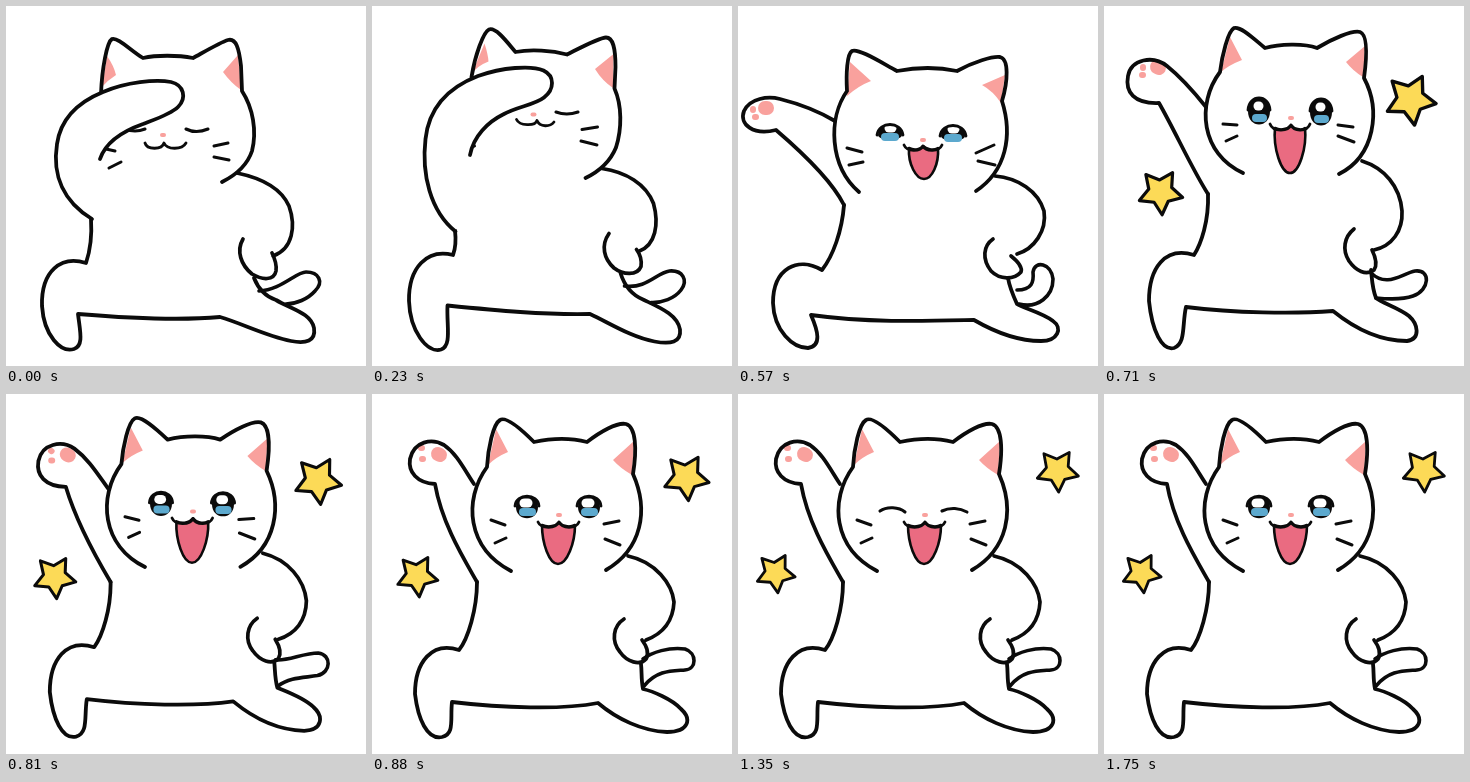
An HTML page for the animation above (1.85 s loop, 360 px wide and 360 px high).

```html
<!DOCTYPE html>
<html lang="en">
<head>
<meta charset="utf-8">
<title>Cat</title>
<style>
html, body { margin: 0; width: 100%; height: 100%; overflow: hidden; background: #fff; }
svg { display: block; width: 100%; height: 100%; }
</style>
</head>
<body>
<svg id="stage" viewBox="0 0 360 360" fill="none" stroke-linecap="round" stroke-linejoin="round"></svg>
<script>
const LOOP = 1850;
const INK = '#0b0b0b', PINK = '#f9a19d', YELLOW = '#fcda57';

// Poses that share keys share path structure, so they can be blended.
const hide = {
  ears: 'M101 50Q108 60 110 69Q102 74 96 81ZM232 49L217 66Q225 77 235 84Z',
  head: 'M95 88C96 62 101 36 106 33C112 31 124 44 137 52C150 49 172 49 187 52C198 46 215 36 222 34C230 32 233 42 235 60L236 85C247 102 251 125 246 145C241 160 228 170 216 176',
  nose: 'M156 129L158 129',
  lips: 'M139 137C141 144 156 144 158 137C161 144 176 144 180 137',
  lids: 'M119 123Q129 127 139 123M180 123Q190 128 202 123',
  whiskers: 'M100 143L109 145M103 162L115 156M208 140L222 137M208 151L223 154',
  arm: 'M86 213C58 196 46 170 51 138C55 110 75 95 97 86C120 76 150 73 165 76C178 79 181 92 172 101C165 108 150 113 137 118C120 124 100 135 94 153',
  legs: 'M85 213C86 228 85 242 80 257C55 249 35 265 36 300C38 330 55 347 68 343C78 340 74 325 72 308C120 312 170 315 214 311C235 317 260 330 285 335C300 338 310 335 308 322C305 307 285 303 270 294C258 290 252 282 248 272',
  side: 'M231 167C255 172 275 182 283 200C290 220 287 243 267 250M237 233C230 245 235 259 246 268C256 274 268 275 270 265C271 258 268 251 266 247',
  tail: 'M253 285C275 284 290 266 300 266C313 266 318 276 309 285C302 293 290 298 280 298'
};
const peek = {
  ears: 'M124 25Q124 36 123 42Q110 45 104 54ZM251 47L229 60Q235 72 247 80Z',
  head: 'M104 54C110 36 122 16 128 14C136 11 146 28 150 40C168 37 188 40 203 45C218 38 240 27 246 29C252 31 254 42 252 62L249 80C253 97 249 120 242 138C235 152 224 162 211 168',
  nose: 'M165 88L167 88',
  lips: 'M150 90C154 96 170 97 172 92C175 99 180 98 184 95',
  lids: 'M136 75Q146 79 156 76M188 89Q199 92 210 89',
  whiskers: 'M80 112L90 114M80 128L90 124M212 107L229 105M210 119L227 124',
  arm: 'M81 238C58 214 53 165 56 128C59 92 80 67 115 54C140 47 168 45 178 53C188 61 184 75 172 82C160 90 140 88 125 99C112 108 103 125 102 145',
  legs: 'M81 236C82 238 83 240 82 241C55 236 38 258 38 290C38 320 55 348 70 344C82 339 75 315 79 291C130 297 175 303 222 305C240 317 258 332 280 336C297 339 309 338 308 325C306 310 290 300 272 293C258 286 252 275 249 262',
  side: 'M229 158C253 160 273 174 280 195C284 215 281 236 266 241M237 222C227 234 229 247 238 256C245 263 262 266 268 256C269 250 267 244 263 240',
  tail: 'M252 275C275 282 278 268 295 264C308 262 315 272 309 283C303 292 290 296 278 295'
};
const reach = {
  ears: 'M112 56L133 75Q120 80 109 90ZM267 69L244 79Q255 85 263 97Z',
  head: 'M121 186C91 160 90 112 109 85C108 68 109 48 114 45C121 42 144 57 159 65C180 61 200 61 219 65C235 56 255 50 262 51C271 53 270 75 264 95C275 130 268 165 238 185',
  nose: 'M184 134L186 134',
  whiskers: 'M109 142L124 146M111 159L125 156M238 147L256 139M240 155L257 159',
  mouth: 'M171 142C177 145 183 143 185 140C188 143 195 145 200 142C201 158 194 173 186 173C178 173 170 158 171 142Z',
  lips: 'M166 139C169 146 182 146 185 140C188 146 201 146 204 139',
  eyes: 'M152 126L215 127',
  eye: 'M-12 3C-11 -12 11 -12 12 3C12 9 -12 9 -12 3Z',
  lash: 'M-13 3C-11 -11 11 -11 13 3',
  iris: 'M-5 5L5 5', shine: 'M-1 -4L2 -4',
  pad: 'M27 102L29 102', toes: 'M15 103L15 104M17 111L18 111',
  limb: 'M106 199C94 175 66 148 38 124C15 130 1 118 6 105C12 92 30 90 42 93C62 98 80 105 97 115',
  legs: 'M106 199C104 225 95 250 84 264C60 250 35 262 35 297C36 325 55 342 70 342C84 340 80 325 73 309C130 317 190 315 236 314C255 325 280 335 303 335C320 335 325 322 315 315C305 307 285 302 279 298C274 287 271 278 270 272',
  side: 'M257 170C280 172 300 185 306 205C309 225 296 243 279 248M255 233C245 240 244 253 253 265C262 274 276 274 283 266C285 260 278 254 273 250',
  tail: 'M279 284C294 284 296 276 295 266C297 254 313 257 315 273C315 290 300 303 281 298'
};
const cheer = {
  ears: 'M126 31L138 54Q125 59 117 66ZM261 40L242 56Q249 65 259 71Z',
  head: 'M139 167C97 148 92 98 116 66C118 50 124 25 130 22C137 20 150 33 161 42C175 38 200 37 213 42C228 33 248 24 256 26C264 29 263 50 260 72C277 104 271 150 235 168',
  nose: 'M186 112L188 112',
  whiskers: 'M119 118L133 119M122 135L133 130M234 119L249 121M234 130L250 136',
  mouth: 'M171 122C177 125 184 123 187 119C190 123 197 125 201 122C203 142 195 167 186 167C177 167 169 142 171 122Z',
  lips: 'M166 118C169 126 184 126 187 119C190 126 203 126 206 118',
  eyes: 'M155 105L217 106',
  eye: 'M-11 0C-11 -18 11 -18 11 0C11 18 -11 18 -11 0Z',
  lash: 'M-11 -1C-10 -17 10 -17 11 -1',
  iris: 'M-3 7L4 7', shine: 'M-1 -5L0 -5',
  pad: 'M53 61L55 62', toes: 'M39 61L39 62M38 69L39 69',
  limb: 'M104 188C88 163 71 125 55 97C30 98 21 86 24 70C27 53 49 49 63 60C78 72 90 86 102 101',
  legs: 'M104 188C105 215 97 238 90 249C61 240 45 262 45 295C48 325 58 345 70 342C82 338 78 318 82 301C130 307 190 308 229 305C250 322 275 335 303 335C317 333 314 318 305 310C295 302 278 297 272 292C268 282 268 272 267 264',
  side: 'M258 155C280 162 296 180 298 205C299 225 288 240 270 244M250 223C240 231 238 244 245 255C252 265 262 270 270 264C274 258 271 250 268 244',
  tail: 'M267 267C283 282 297 268 311 265C327 263 326 284 309 290C298 294 282 293 272 292'
};
const wave = {
  ears: 'M124 35L136 58Q124 63 116 71ZM262 47L241 66Q248 74 260 81Z',
  head: 'M139 177C95 154 91 106 115 73C116 55 121 30 128 26C134 22 150 36 162 48C180 44 200 44 215 48C228 38 245 28 254 30C264 33 265 55 261 80C277 116 270 155 234 176',
  nose: 'M186 121L188 121',
  whiskers: 'M119 126L133 131M123 149L134 144M232 130L247 127M233 145L248 151',
  mouth: 'M170 131C177 134 184 132 187 128C190 132 197 134 203 131C203 149 195 170 186 170C177 170 170 149 170 131Z',
  lips: 'M166 128C169 135 184 135 187 128C190 135 204 135 207 128',
  eyes: 'M155 113L217 113',
  eye: 'M-11 0C-11 -15 11 -15 11 0C11 15 -11 15 -11 0Z',
  lash: 'M-12 -1C-11 -14 11 -14 12 -1',
  iris: 'M-4 5L5 5', shine: 'M-3 -4L1 -4',
  pad: 'M66 60L68 61', toes: 'M49 54L50 54M50 65L51 65',
  limb: 'M105 188C92 165 70 130 63 90C45 89 36 78 38 65C42 47 60 44 72 51C85 60 92 75 102 90',
  legs: 'M105 188C105 215 96 245 87 256C60 247 43 268 43 300C46 325 55 346 70 343C83 340 78 325 80 308C130 314 190 316 226 309C245 325 270 337 295 338C317 338 320 325 309 315C300 305 280 297 271 295C269 285 270 278 269 270',
  side: 'M256 162C284 168 300 190 302 208C301 228 290 240 274 246M252 225C241 232 239 247 248 258C255 268 268 272 274 265C278 258 273 250 270 246',
  tail: 'M271 265C280 258 297 253 313 255C325 259 325 275 313 276C300 277 285 276 272 292'
};
const smile = { ...wave, eyes: '', lids: 'M142 117C149 112 161 113 167 118M204 117C212 113 222 114 229 118' };

const NUM = /-?\d+(\.\d+)?/g;
function blend(a, b, k) {
  const out = {};
  for (const key in a) {
    const to = b[key].match(NUM);
    let i = 0;
    out[key] = a[key].replace(NUM, n => +n + (to[i++] - n) * k);
  }
  return out;
}

// [start time, pose, eye opening]
const steps = [
  [0, hide, 1], [230, blend(hide, peek, .5), 1], [300, peek, 1],
  [570, reach, 1], [640, blend(reach, cheer, .6), 1], [710, cheer, 1],
  [810, blend(cheer, wave, .6), 1], [880, wave, 1], [950, wave, 1], [1050, wave, 1],
  [1150, wave, .55], [1220, smile, 1], [1250, smile, 1], [1350, smile, 1],
  [1450, smile, 1], [1580, wave, .55], [1650, wave, 1]
];

const stage = document.getElementById('stage');
function add(tag, attrs, parent = stage) {
  const el = document.createElementNS('http://www.w3.org/2000/svg', tag);
  for (const name in attrs) el.setAttribute(name, attrs[name]);
  return parent.appendChild(el);
}
const line = width => ({ stroke: INK, 'stroke-width': width });
const layers = {
  tail: line(3.6), legs: line(3.8), side: line(3.7),
  ears: { fill: PINK }, head: line(3.8),
  nose: { stroke: PINK, 'stroke-width': 4 },
  whiskers: line(3),
  mouth: { fill: '#ea6b81', ...line(2.6) },
  lips: line(2.8), lids: line(3.1),
  pad: { stroke: PINK, 'stroke-width': 14 },
  toes: { stroke: PINK, 'stroke-width': 6 },
  limb: line(3.8),
  arm: { fill: '#fff', ...line(3.8) }
};
const parts = {};
for (const key in layers) parts[key] = add('path', layers[key]);

const eyeLayers = {
  eye: { fill: INK },
  iris: { stroke: '#5ca9ce', 'stroke-width': 8 },
  shine: { stroke: '#fff', 'stroke-width': 9 },
  lash: line(2.8)
};
const eyes = [0, 1].map(() => {
  const group = add('g');
  const shapes = {};
  for (const key in eyeLayers) shapes[key] = add('path', eyeLayers[key], group);
  return { group, shapes };
});

function starPath(r) {
  let d = '';
  for (let i = 0; i < 10; i++) {
    const a = (i * 36 - 90) * Math.PI / 180, q = i % 2 ? r * .53 : r;
    d += (i ? 'L' : 'M') + q * Math.cos(a) + ' ' + q * Math.sin(a);
  }
  return d + 'Z';
}
// Resting place, offset at launch, resting tilt and extra spin
const stars = [
  { x: 37.5, y: 179, dx: 19, dy: 7, r: 20, grow: .14, tilt: 29, spin: 3 },
  { x: 319.5, y: 76.5, dx: -13, dy: 17, r: 21.6, grow: .2, tilt: 33, spin: -6 }
];
for (const s of stars) s.el = add('path', { d: starPath(s.r), fill: YELLOW, ...line(2.8) });

function draw(t) {
  const [at, pose, open] = steps.findLast(s => s[0] <= t);
  for (const key in parts) parts[key].setAttribute('d', pose[key] || '');

  const spots = (pose.eyes || '').match(NUM);
  eyes.forEach(({ group, shapes }, i) => {
    group.setAttribute('display', spots ? 'inline' : 'none');
    if (!spots) return;
    group.setAttribute('transform', `translate(${spots[i * 2]} ${spots[i * 2 + 1]}) scale(1 ${open})`);
    for (const key in shapes) shapes[key].setAttribute('d', pose[key]);
  });

  const k = at >= 1350 ? 0 : Math.exp((710 - at) / 188);
  for (const s of stars) {
    s.el.setAttribute('display', at >= 710 ? 'inline' : 'none');
    s.el.setAttribute('transform',
      `translate(${s.x + s.dx * k} ${s.y + s.dy * k}) rotate(${s.tilt + s.spin * k}) scale(${1 + s.grow * k})`);
  }
}

const begin = performance.now();
function tick() {
  draw((performance.now() - begin) % LOOP);
  requestAnimationFrame(tick);
}
tick();
</script>
</body>
</html>
```
